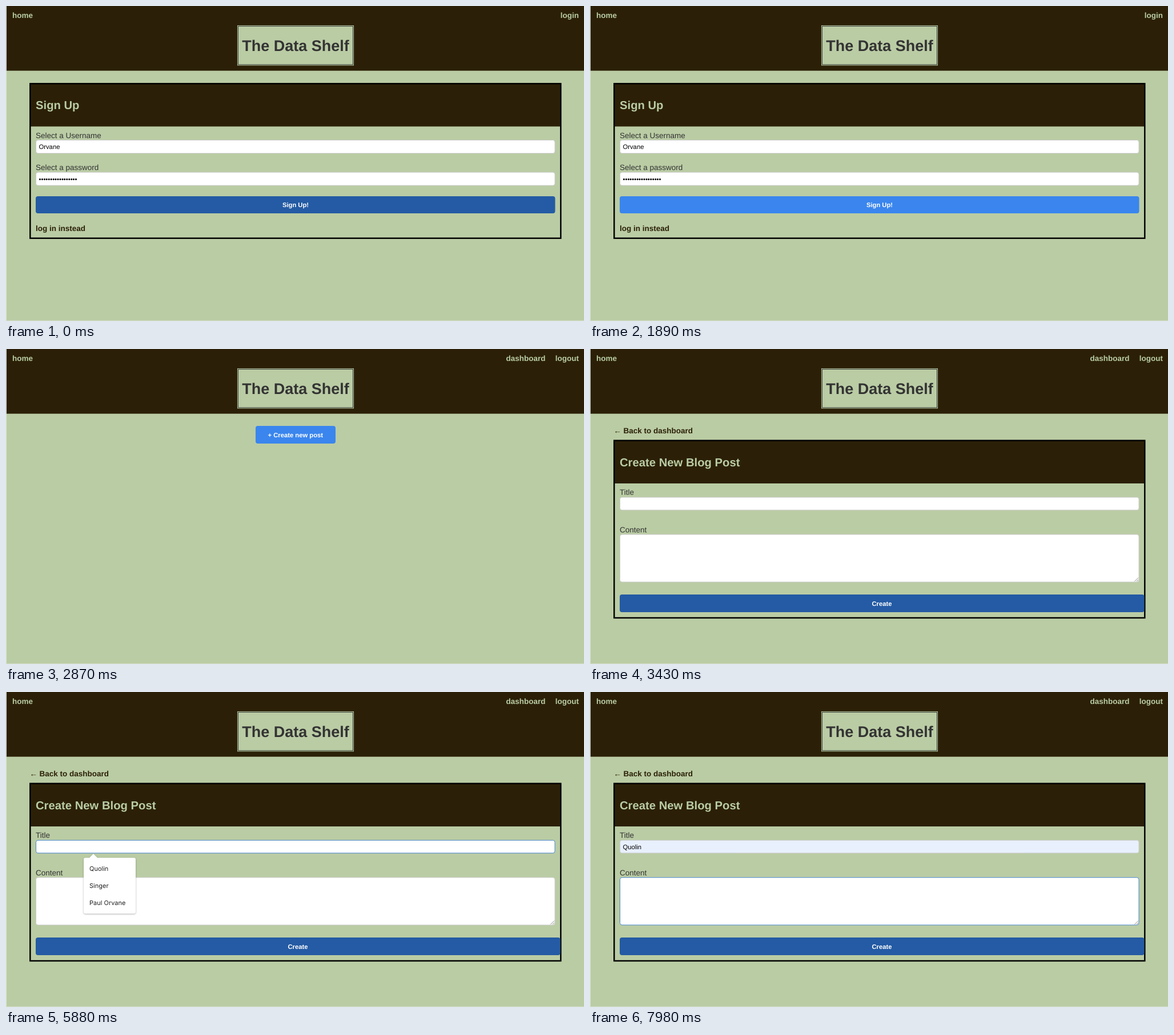
Write an HTML page that moves like this. It is 1012 by 553 pixels and loops after 8 s.

```html
<!DOCTYPE html>
<html lang="en">
<head>
<meta charset="utf-8">
<title>Blog sign up</title>
<style>
  html, body { margin: 0; width: 100%; height: 100%; overflow: hidden; background: #bacca4; }
  svg { display: block; width: 1012px; height: 553px; }
  text { font: 13.5px "Liberation Sans", Arial, sans-serif; fill: #333; text-rendering: geometricPrecision; white-space: pre; }
  .nav text, .link, .head, .btn text { font-weight: bold; }
  .nav text, .head { fill: #bacca4; }
  .link { fill: #2b2007; }
  .head { font-size: 20.25px; }
  .end { text-anchor: end; }
  .value { font-size: 11.25px; fill: #000; }
  .btn rect { fill: #245ba4; }
  .btn text { font-size: 11.25px; fill: #fff; text-anchor: middle; }
  .field { fill: #fff; stroke: #ccc; }
  .card { fill: none; stroke: #000; stroke-width: 2.5; }
  .dark { fill: #2b2007; }
  #popup text { font: 11px Inter, "Open Sans", sans-serif; fill: #222; }
  #popup path { fill: #fff; filter: drop-shadow(0 1px 1.5px rgba(0, 0, 0, .3)); }
</style>
</head>
<body>
<svg viewBox="0 0 1012 553">
  <rect width="1012" height="553" fill="#bacca4"/>
  <rect class="dark" width="1012" height="113.6"/>
  <rect x="405" y="34" width="204" height="70.5" fill="#bacca4"/>
  <rect x="406.5" y="35.5" width="201" height="67.5" fill="none" stroke="#333"/>
  <text x="507" y="79" text-anchor="middle" style="font-size:27px;font-weight:bold">The Data Shelf</text>
  <g class="nav">
    <text x="11" y="21">home</text>
    <text class="end" id="login" x="1003" y="21">login</text>
    <g id="member">
      <text class="end" x="944.5" y="21">dashboard</text>
      <text class="end" x="1003" y="21">logout</text>
    </g>
  </g>

  <g id="signup">
    <rect class="dark" x="43" y="137" width="928" height="74.5"/>
    <rect class="card" x="42.3" y="136.3" width="929" height="271.4"/>
    <text class="head" x="52" y="181.3">Sign Up</text>
    <text x="52" y="232">Select a Username</text>
    <rect class="field" x="52.5" y="235.5" width="908.5" height="23" rx="3.5"/>
    <text class="value" x="57.5" y="251.3">Orvane</text>
    <text x="52" y="288.4">Select a password</text>
    <rect class="field" x="52.5" y="292" width="908.5" height="23" rx="3.5"/>
    <text class="value" x="57.5" y="307.7">•••••••••••••••••</text>
    <g class="btn">
      <rect id="signupBtn" x="52" y="334" width="909.5" height="30" rx="4"/>
      <text x="507" y="352.6">Sign Up!</text>
    </g>
    <text class="link" x="52" y="394.7">log in instead</text>
  </g>

  <g id="dashboard" class="btn">
    <rect id="newBtn" x="437" y="135" width="140" height="31" rx="4"/>
    <text x="506.8" y="154.5">+ Create new post</text>
  </g>

  <g id="editor">
    <text class="link" x="41.5" y="147.5">←</text>
    <text class="link" x="58.5" y="147.5">Back to dashboard</text>
    <rect class="dark" x="43" y="161" width="928" height="75"/>
    <rect class="card" x="42.3" y="160.7" width="929" height="311.3"/>
    <text class="head" x="52" y="205.8">Create New Blog Post</text>
    <text x="52" y="256.4">Title</text>
    <rect class="field" id="title" x="52.5" y="260.3" width="908.5" height="22.5" rx="3.5"/>
    <text class="value" id="entry" x="57.5" y="275.7">Quolin</text>
    <text x="52" y="322">Content</text>
    <rect class="field" id="content" x="52.5" y="325.7" width="908.5" height="83.3" rx="3.5"/>
    <path d="M953.5 408l6.5-6.5M957 408l3-3" stroke="#888" fill="none"/>
    <g class="btn">
      <rect x="52" y="431" width="918.5" height="31" rx="4"/>
      <text x="511" y="450.7">Create</text>
    </g>
    <rect id="caret" width="1" height="13"/>
    <g id="popup">
      <path d="M139 291H146L153 284L160 291H224a3 3 0 0 1 3 3V386a3 3 0 0 1-3 3H139a3 3 0 0 1-3-3V294a3 3 0 0 1 3-3z"/>
      <rect id="rowHover" x="136" y="295" width="91" height="30" fill="#e6e6e6"/>
      <text x="146" y="314">Quolin</text>
      <text x="146" y="344">Singer</text>
      <text x="146" y="374.3">Paul Orvane</text>
    </g>
  </g>

  <path d="M.5 0V553" stroke="#dde5d2"/>
  <path d="M0 552.5H1012" stroke="#d3dcc7"/>
</svg>
<script>
  const LOOP = 8000;
  const el = id => document.getElementById(id);
  const show = (id, on) => { el(id).style.display = on ? '' : 'none'; };

  // Last value whose start time has passed.
  const step = (t, keys) => keys.reduce((v, [at, next]) => t >= at ? next : v, 0);

  const BLUE = [36, 91, 164], BRIGHT = [58, 134, 238];
  const hover = (id, k) => {
    el(id).style.fill = `rgb(${BLUE.map((c, i) => Math.round(c + (BRIGHT[i] - c) * k))})`;
  };
  const focus = (id, on) => { el(id).style.stroke = on ? '#4a88d0' : '#ccc'; };

  const signupHover = [[910, .5], [980, 1], [1400, .5], [1470, .1], [1540, 0],
    [1610, .5], [1680, 1], [1820, .5], [1890, 1]];
  const newHover = [[2520, .5], [2590, 1], [2800, .5], [2870, 1]];
  const caretOn = [[4340, 1], [4830, 0], [5390, 1], [5880, 0], [6440, 1], [7630, 0]];

  function draw(t) {
    show('signup', t < 1960);
    show('login', t < 1960);
    show('member', t >= 1960);
    show('dashboard', t >= 1960 && t < 3430);
    show('editor', t >= 3430);
    hover('signupBtn', step(t, signupHover));
    hover('newBtn', step(t, newHover));

    const filled = t >= 6160, chosen = t >= 6580, inContent = t >= 7070;
    focus('title', t >= 4340 && !inContent);
    focus('content', inContent);
    el('title').style.fill = filled ? '#e8f0fe' : '#fff';
    show('entry', filled);
    show('popup', t >= 4340 && !chosen);
    show('rowHover', filled);
    show('caret', step(t, caretOn));
    el('caret').setAttribute('x', chosen && !inContent ? 91 : 57);
    el('caret').setAttribute('y', inContent ? 330 : 265);
  }

  const start = performance.now();
  function tick() {
    draw((performance.now() - start) % LOOP);
    requestAnimationFrame(tick);
  }
  tick();
</script>
</body>
</html>
```
